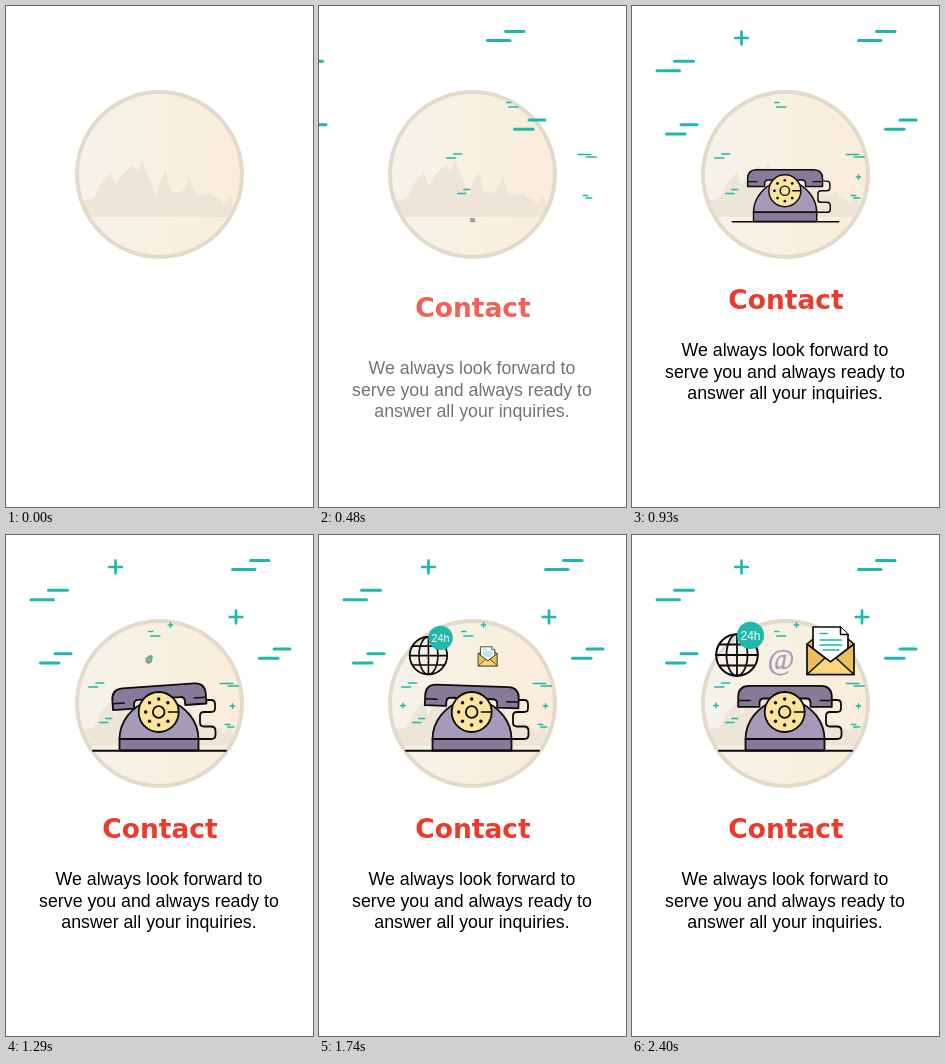
Animation, 307 px wide and 501 px high, one loop 4730 ms. Source, as an HTML page with a canvas:

```html
<!DOCTYPE html>
<html lang="en">
<head>
<meta charset="utf-8">
<title>Contact</title>
<style>
html, body { margin: 0; width: 100%; height: 100%; overflow: hidden; background: #fff; }
canvas { display: block; }
</style>
</head>
<body>
<canvas id="stage"></canvas>
<script>
const W = 307, H = 501, LOOP = 4730, TICK = 30, DUR = 600;
const TEAL = '#1fb8aa', INK = '#0b0b0b', PLUM = '#857b99', LILAC = '#a59bb9';
const SANS = '"Liberation Sans", Arial, sans-serif';

const canvas = document.getElementById('stage');
const ctx = canvas.getContext('2d');
const dpr = window.devicePixelRatio || 1;
canvas.width = W * dpr;
canvas.height = H * dpr;
canvas.style.width = W + 'px';
canvas.style.height = H + 'px';

const progress = (t, start, dur = DUR) => Math.min(1, Math.max(0, (t - start) / dur));
const mix = (a, b, p) => a + (b - a) * p;

function shape(d, fill, stroke, width = 1.8) {
  const path = new Path2D(d);
  if (fill) { ctx.fillStyle = fill; ctx.fill(path); }
  if (stroke) { ctx.strokeStyle = stroke; ctx.lineWidth = width; ctx.stroke(path); }
}

function disc(x, y, r, fill, stroke, width = 1.8) {
  ctx.beginPath();
  ctx.arc(x, y, r, 0, Math.PI * 2);
  if (fill) { ctx.fillStyle = fill; ctx.fill(); }
  if (stroke) { ctx.strokeStyle = stroke; ctx.lineWidth = width; ctx.stroke(); }
}

function label(text, x, y, font, color) {
  ctx.font = font;
  ctx.fillStyle = color;
  ctx.textAlign = 'center';
  ctx.fillText(text, x, y);
}

function group(draw) {
  ctx.save();
  draw();
  ctx.restore();
}

// Grow a drawing around its centre while it travels from one point to another.
function grow(p, from, to, draw) {
  if (p <= 0) return;
  group(() => {
    ctx.translate(mix(from[0], to[0], p), mix(from[1], to[1], p));
    ctx.scale(p, p);
    ctx.translate(-to[0], -to[1]);
    draw();
  });
}

const RIDGE = 'M66 211V194H78L86 193Q90 189 92 184Q94 177 99 173L105 166L109 180L117 168L124 161' +
  'L128 160L131 165L136 155L143 172L150 190L154 176L160 164L163 181Q165 187 170 187Q176 187 179 181' +
  'L184 171L189 186L194 189L202 188L204 185L206 190L214 193L217 198L221 195L224 189L228 202L240 205V211Z';

function backdrop() {
  const sky = ctx.createLinearGradient(71, 0, 236, 0);
  sky.addColorStop(0, '#f5f2ed');
  sky.addColorStop(0.5, '#f6f1e0');
  sky.addColorStop(1, '#fbecda');
  disc(153.5, 168.5, 82.5, sky);
  group(() => {
    ctx.clip();
    shape(RIDGE, '#ede6d8');
  });
  disc(153.5, 168.5, 82.5, null, '#e3dacb', 4);
}

// Each entry: left edge, right edge, y.
const LONG = [[243, 264.5, 25.5], [225, 250.5, 34.5], [41, 63, 55.3], [23.5, 49, 64.8],
  [47.5, 66.5, 118.8], [33, 54.5, 128], [266.5, 285.5, 114], [252, 273.5, 123.3]];
const SHORT = [[142, 147.5, 96.5], [144, 154.5, 101], [89, 98.5, 148], [82, 92.5, 152],
  [99, 106.5, 183.5], [93, 102.5, 187.5], [213.5, 227.5, 148.5], [221.5, 233, 151],
  [218.5, 224.5, 189.5], [221, 228.5, 192]];

function dashes(list, width, dx) {
  ctx.strokeStyle = TEAL;
  ctx.lineWidth = width;
  for (const [a, b, y] of list) {
    ctx.beginPath();
    ctx.moveTo(a + width / 2 + dx, y);
    ctx.lineTo(b - width / 2 + dx, y);
    ctx.stroke();
  }
}

function plus(x, y, r, width, p) {
  grow(p, [x, y], [x, y], () =>
    shape(`M${x - r} ${y}H${x + r}M${x} ${y - r}V${y + r}`, null, TEAL, width));
}

function sparks(t) {
  const p = progress(t, 0);
  if (p > 0) {
    dashes(LONG, 3, -290 * (1 - p));
    dashes(SHORT, 1.4, 225 * (1 - p));
  }
  const [first, second, third] = [630, 930, 1290].map(start => progress(t, start, 240));
  plus(109.5, 32, 6.3, 2.7, first);
  plus(226.5, 171, 2.3, 1.4, first);
  plus(230, 82, 6.3, 2.7, second);
  plus(164.5, 90, 2.3, 1.4, second);
  plus(84, 170.5, 2.3, 1.4, third);
}

function swing(t) {
  if (t < 1200) return -10 * progress(t, 1050, 150);
  if (t < 1500) return mix(-10, 10, progress(t, 1200, 300));
  return 10 * (1 - progress(t, 1500, 300));
}

function phone(t) {
  shape('M192 165H205Q209 165 209 169V173.500Q209 177 205 177H198Q194 177 194 181V187.500' +
    'Q194 191.500 198 191.500H205Q209.500 191.500 209.500 196V200Q209.500 204 205 204H192', null, INK);
  shape('M113.500 204C113.500 186 126 172 143 165H163C180 172 192.500 186 192.500 204Z', LILAC, INK);
  shape('M113.500 204H192.500V215.500H113.500Z', PLUM, INK);
  shape('M87 215.700H220', null, INK, 2);
  group(() => {
    ctx.translate(153, 161);
    ctx.rotate(swing(t) * Math.PI / 180);
    ctx.translate(-153, -161);
    shape('M117 150.800H189Q199.800 151 199.800 162V171.800H178.500V168Q178.500 163.500 174 163.500' +
      'H132Q127.500 163.500 127.500 168V171.800H106.200V162Q106.200 151 117 150.800Z', PLUM, INK);
    shape('M106.500 165.500H118M188 165.500H199.500', null, INK, 1.5);
  });
  disc(152.7, 177, 20, '#fbe3a0', INK, 1.8);
  disc(152.7, 177, 5.8, null, INK, 1.8);
  for (let i = 1; i < 8; i++) {
    const a = i * Math.PI / 4;
    disc(152.7 + 13 * Math.cos(a), 177 + 13 * Math.sin(a), 1.7, INK);
  }
  shape('M162.500 177H172', null, INK, 1.6);
}

function globe() {
  disc(105, 120, 20.8, null, INK, 2);
  shape('M105 99V141M84 120H126M88 109.500H122M88 130.500H122', null, INK, 1.8);
  ctx.beginPath();
  ctx.ellipse(105, 120, 10.5, 20.8, 0, 0, Math.PI * 2);
  ctx.stroke();
  disc(118.5, 100.3, 13.6, TEAL);
  label('24h', 118.5, 104.6, '12px ' + SANS, '#fff');
}

function letter() {
  shape('M175 109L198.500 91.500L222 109V139.500H175Z', '#e8bb56');
  shape('M175 109L181 104M216 104L222 109', null, INK, 1.6);
  shape('M181 92H208.500L216 99.500V114L198.500 128L181 114Z', '#fff', INK, 1.7);
  shape('M208.500 92V99.500H216', '#fff', INK, 1.5);
  shape('M188 98.500H195.500M188 105H209.500M188 110H209.500M191 115H207', null, TEAL, 1.5);
  shape('M175 109L198.500 127L222 109V139.500H175Z', '#eabf5c', INK, 1.7);
  shape('M175 139.500L193 123L198.500 127L204 123L222 139.500Z', '#fad77c', INK, 1.5);
}

function at() {
  label('@', 149, 133.8, '29px "Liberation Serif", "Times New Roman", serif', LILAC);
  ctx.strokeStyle = LILAC;
  ctx.lineWidth = 0.5;
  ctx.strokeText('@', 149, 133.8);
}

const LINES = ['We always look forward to', 'serve you and always ready to', 'answer all your inquiries.'];

function copy(t) {
  const rise = (p, draw) => group(() => {
    ctx.globalAlpha = p;
    ctx.translate(0, 40 * (1 - p));
    draw();
  });
  rise(progress(t, 0), () =>
    label('Contact', 154, 303, 'bold 26.5px "DejaVu Sans", sans-serif', '#ee3a2b'));
  rise(progress(t, 150), () =>
    LINES.forEach((s, i) => label(s, 153, Math.round(350 + i * 21.5), '17.75px ' + SANS, '#000')));
}

function draw(t) {
  ctx.setTransform(dpr, 0, 0, dpr, 0, 0);
  ctx.fillStyle = '#fff';
  ctx.fillRect(0, 0, W, H);
  ctx.lineCap = ctx.lineJoin = 'round';
  backdrop();
  sparks(t);
  grow(progress(t, 450), [153.5, 215.7], [153.5, 215.7], () => phone(t));
  grow(progress(t, 1200), [149.4, 126], [105, 120], globe);
  grow(progress(t, 1500), [149, 125], [198.5, 116], letter);
  grow(progress(t, 1800), [149, 126], [149, 126], at);
  copy(t);
}

const origin = performance.now();
function frame() {
  const t = (performance.now() - origin) % LOOP;
  draw(Math.floor(t / TICK) * TICK);
  requestAnimationFrame(frame);
}
frame();
</script>
</body>
</html>
```
